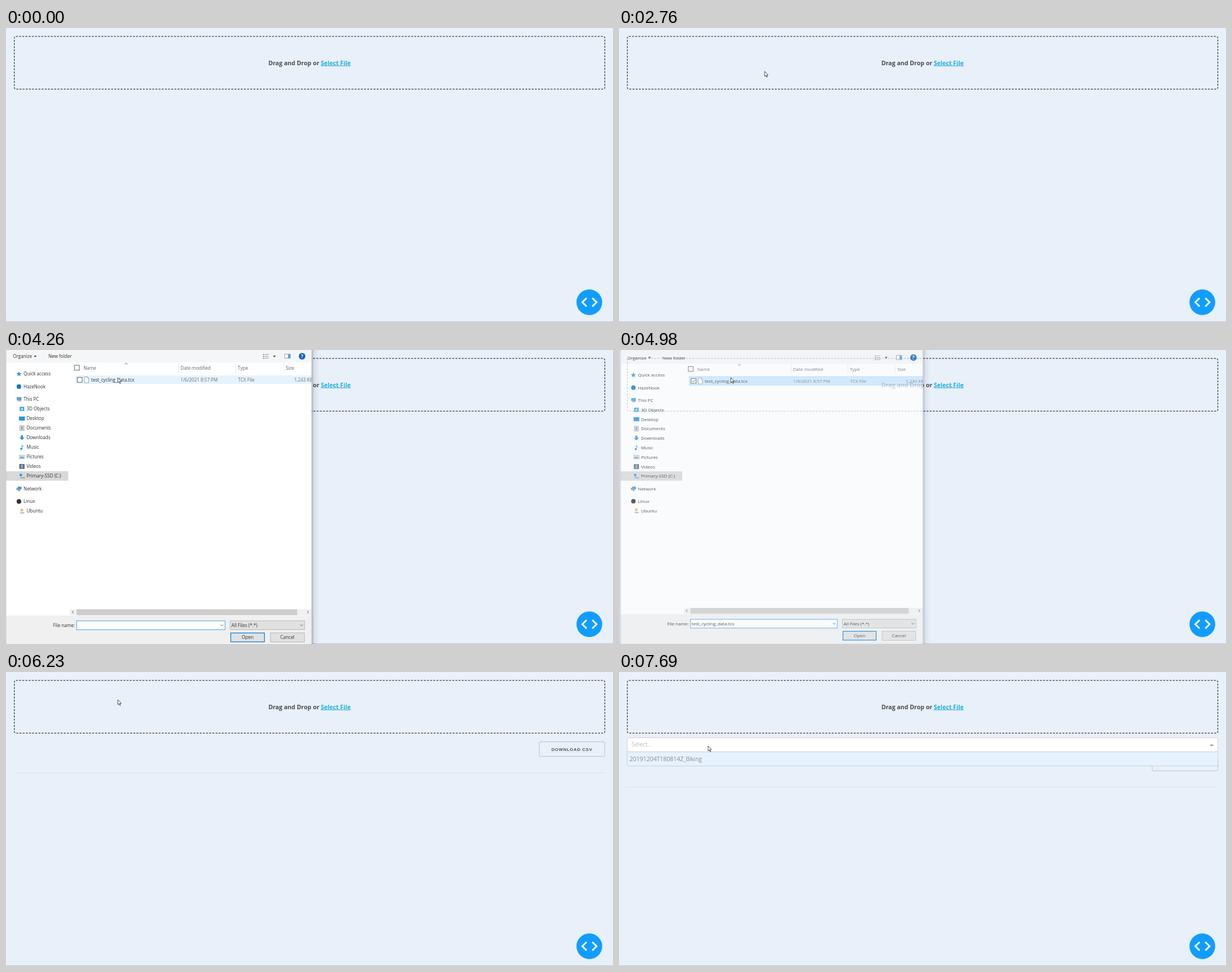
An HTML page for the animation above (8000 ms loop, 1075 by 521 pixels).

```html
<!DOCTYPE html>
<html lang="en">
<head>
<meta charset="utf-8">
<title>File upload</title>
<style>
  html, body { margin: 0; width: 100%; height: 100%; overflow: hidden; background: #e8f0fa; }
  svg { display: block; width: 100%; height: 100%; font-family: "Open Sans", sans-serif; }
  .upload { font-size: 10.59px; font-weight: 700; fill: #4c4c4c; }
  .light { font-size: 10.5px; font-weight: 300; }
  .button { font: 700 7.7px "Liberation Sans", Arial, sans-serif; letter-spacing: .7px; fill: #555; }
  #dialog { font-size: 8px; fill: #303030; }
  .head { fill: #5a6472; }
  .dim { fill: #6d6d6d; }
  .line { fill: none; stroke: #4a4a4a; stroke-width: .9; }
</style>
</head>
<body>
<svg viewBox="0 0 1075 521">
  <defs>
    <linearGradient id="shade">
      <stop stop-color="#000" stop-opacity=".28"/>
      <stop offset=".3" stop-color="#000" stop-opacity=".07"/>
      <stop offset="1" stop-color="#000" stop-opacity="0"/>
    </linearGradient>
    <clipPath id="window"><rect x="2.4" y="-40" width="536.1" height="570"/></clipPath>
  </defs>

  <rect width="1075" height="521" fill="#e8f0fa"/>
  <rect y="520" width="1075" height="1" fill="#bcc3cc"/>
  <rect x="14.7" y="14.8" width="1045.8" height="93.6" rx="3" fill="none" stroke="#363636" stroke-width="1.3" pathLength="4060" stroke-dasharray="6 4"/>
  <text class="upload" x="464.7" y="65.5">Drag and Drop or <tspan fill="#1eaedb" text-decoration="underline">Select File</tspan></text>

  <g id="results">
    <rect x="944.2" y="123.7" width="116.4" height="26" rx="2.8" fill="none" stroke="#bbb" stroke-width=".9"/>
    <text class="button" x="966" y="139.8">DOWNLOAD CSV</text>
    <path d="M14 178.5H1061" stroke="#dde2e9"/>
  </g>

  <g id="select">
    <rect x="14.5" y="116.4" width="1046.2" height="25" rx="2.8" fill="#fff" stroke="#ccc" stroke-width=".9"/>
    <text class="light" x="22.3" y="132.4" fill="#999">Select...</text>
    <path id="arrow" fill="#999"/>
  </g>
  <g id="menu">
    <path d="M14.5 141.5H1060.7V164Q1060.7 166.5 1058 166.5H17.3Q14.5 166.5 14.5 164Z" fill="#e6f2fe" stroke="#ccc" stroke-width=".9"/>
    <text class="light" x="18.8" y="157.7" fill="#555">20191204T180814Z_Biking</text>
  </g>

  <g id="dialog"></g>

  <circle cx="1033.1" cy="486" r="22.8" fill="#119dff"/>
  <path d="M1028.2 478.6L1020.6 486L1028.2 493.4M1038.4 478.6L1046 486L1038.4 493.4" fill="none" stroke="#fff" stroke-width="2.9"/>

  <circle id="press" r="8.6" fill="#ff0" fill-opacity=".5"/>
  <path id="cursor" d="M.4 .6V9.4L2.4 7.6L4 11L5.3 10.4L3.8 7.2H6.5Z" fill="#fff" stroke="#222" stroke-width=".8"/>
</svg>

<script>
const $ = id => document.getElementById(id);
const text = (x, y, label, cls = '', anchor = 'start') =>
  `<text x="${x}" y="${y}" class="${cls}" text-anchor="${anchor}">${label}</text>`;
const rect = (x, y, w, h, fill, stroke = 'none', width = 1) =>
  `<rect x="${x}" y="${y}" width="${w}" height="${h}" fill="${fill}" stroke="${stroke}" stroke-width="${width}"/>`;
const path = (d, fill = 'none', stroke = 'none') => `<path d="${d}" fill="${fill}" stroke="${stroke}" stroke-width=".9"/>`;
const dot = (x, y, r, fill) => `<circle cx="${x}" cy="${y}" r="${r}" fill="${fill}"/>`;
const line = d => `<path d="${d}" class="line"/>`;
const chevron = (x, y) => line(`M${x - 2.3} ${y - 1}l2.3 2.3l2.3 -2.3`);
const group = (id, content) => `<g id="${id}">${content}</g>`;

// Icons are centred on 0,0.
const icons = {
  star: path('M0 -4.8L1.3 -1.4L4.8 -1.4L2 .8L3 4.4L0 2.2L-3 4.4L-2 .8L-4.8 -1.4L-1.3 -1.4Z', '#2f9be0'),
  disc: dot(0, 0, 4, '#0f78d4'),
  computer: rect(-3.5, -3.5, 7.5, 5, '#4aa7e6', '#7b98ad', .8) + rect(-1.5, 2.3, 5, 1.3, '#8da1b0'),
  cube: rect(-4, -3.6, 8, 7.2, '#35a3dc') + rect(-2, -1.4, 4, 3.6, '#a9def5'),
  screen: rect(-4.6, -3, 9.2, 6.2, '#1d9be6', '#1579bd', .8),
  page: rect(-3.6, -4.3, 7.2, 8.6, '#eef3f7', '#8795a3', .8) + line('M-2 -2H2M-2 0H2M-2 2H2'),
  down: path('M-1.8 -4.4H1.8V-.4H4.4L0 4.4L-4.4 -.4H-1.8Z', '#3d8fd1'),
  note: dot(-1.3, 2.8, 1.8, '#1a8fe0') + path('M0 3V-4Q1 -2 3 -1', 'none', '#1a8fe0'),
  picture: rect(-4.6, -3, 9.2, 6.2, '#e6edf2', '#93a3b0', .8) + rect(-3.2, -.4, 6.4, 2.4, '#5b9cc8'),
  film: rect(-4.4, -4.2, 8.8, 8.4, '#4d5560') + rect(-2.3, -3.2, 4.6, 6.4, '#7ba6d0'),
  drive: rect(-4, -3.8, 4, 4, '#1d9be6') + rect(-3, 2, 8, 2, '#98a2aa'),
  network: rect(-2, -3.6, 6.4, 5, '#3a93d3') + rect(-4.4, -1.6, 5, 4, '#7c9db5') + rect(-1, 2.4, 3, 1.6, '#3a7fb5'),
  dark: dot(0, 0, 4, '#333'),
  tan: rect(-2.4, -4, 4.4, 4.8, '#e5ba78') + rect(-3, 2.2, 7, 2, '#b9b0a4')
};

const places = [['Quick access', 'star'], ['HazeNook', 'disc'], ['This PC', 'computer']];
const folders = [['3D Objects', 'cube', 1], ['Desktop', 'screen', 1], ['Documents', 'page', 1],
  ['Downloads', 'down', 1], ['Music', 'note', 1], ['Pictures', 'picture', 1], ['Videos', 'film', 1],
  ['Primary-SSD (C:)', 'drive', 1]];
const others = [['Network', 'network'], ['Linux', 'dark'], ['Ubuntu', 'tan', 1]];

function tree(items, selected) {
  let y = 22.1;
  return items.map(([label, icon, child], i) => {
    y += child ? 16.8 : 22.3;
    const indent = child ? 5.3 : 0;
    return (i === selected ? rect(2, y - 8.4, 110, 16.6, '#d9d9d9') : '') +
      `<g transform="translate(${25.5 + indent} ${y})">${icons[icon]}</g>` +
      text(33.6 + indent, y + 2.9, label);
  }).join('');
}

const toolbar = text(15, 16.7, 'Organize') + path('M51.6 12.3h5l-2.5 3Z', '#444') + text(77, 16.7, 'New folder') +
  [9.5, 12.8, 16.1].map(y => rect(453, y, 2.4, 1.8, '#8a9aa8') + rect(456.5, y + .3, 6.5, 1, '#999')).join('') +
  path('M470.5 12.3h5l-2.5 3Z', '#444');

const header = rect(122.7, 29.3, 8.6, 8.6, '#fff', '#555', .9) + line('M211 27.4l2.3 -2l2.3 2') +
  [304.5, 405, 488.5].map(x => rect(x, 25, .8, 17, '#e3e3e3')).join('') +
  [[138.5, 'Name'], [308.5, 'Date modified'], [409, 'Type'], [493, 'Size']].map(([x, s]) => text(x, 36.7, s, 'head')).join('');

const fileRow = group('hover', rect(124.8, 47.2, 420, 15, '#e5f3ff') + rect(127.7, 50.4, 8.6, 8.6, '#fff', '#555', .9)) +
  group('chosen', rect(124.8, 47.2, 420, 15, '#cce8ff', '#99d1ff', .8) +
    rect(127.7, 50.4, 8.6, 8.6, '#fff', '#555', .9) + line('M129.5 54.8l2 2.1l3.4 -4.2')) +
  path('M140.4 49.4H145.4L147.7 51.7V60H140.4ZM145.4 49.4V51.7H147.7', '#fff', '#999') +
  text(152, 57.9, 'test_cycling_data.tcx') + text(308.5, 57.9, '1/6/2021 8:57 PM', 'dim') +
  text(409.5, 57.9, 'TCX File', 'dim') + text(507.8, 57.9, '1,243 KB', 'dim');

const footer = rect(115, 457, 423, 10.5, '#f0f0f0') + rect(126.5, 457, 386.3, 10.5, '#cdcdcd') +
  line('M121.2 459.7l-2.3 2.3l2.3 2.3M530.6 459.7l2.3 2.3l-2.3 2.3') +
  rect(2, 468, 540, 70, '#f0f0f0') + text(123.5, 487.8, 'File name:', '', 'end') +
  rect(126.6, 477.2, 260, 15.6, '#fff', '#3f94db', .9) + chevron(381, 484.8) +
  group('caret', rect(128.6, 479.5, .9, 11, '#222')) + group('filename', text(128.6, 487.8, 'test_cycling_data.tcx')) +
  rect(395.5, 477.2, 130.5, 15.4, '#e1e1e1', '#adadad', .8) + text(397.8, 487.8, 'All Files (*.*)') + chevron(520.5, 484.8) +
  rect(396.6, 498.5, 58.9, 15.6, '#e1e1e1', '#0078d7', 1.2) + text(426, 509, 'Open', '', 'middle') +
  rect(466, 498.2, 59.6, 16.2, '#e1e1e1', '#adadad', .8) + text(495.7, 509, 'Cancel', '', 'middle');

$('dialog').innerHTML = rect(-12, -40, 14.5, 570, '#cbd2da') + rect(538.4, -40, 14, 570, 'url(#shade)') +
  '<g clip-path="url(#window)">' +
  rect(2, -40, 540, 570, '#fff') + rect(2, -40, 540, 64.3, '#f5f6f7') +
  group('toolbar', toolbar) +
  rect(491.3, 9.5, 9.5, 7.6, '#fff', '#7b8c99', .8) + rect(496.8, 10, 3.8, 6.7, '#4aa3e0') +
  dot(521.5, 13.4, 5.8, '#1a69c0') +
  '<text x="521.5" y="16.4" text-anchor="middle" font-weight="700" fill="#fff">?</text>' +
  header + fileRow +
  group('collapsed', tree([...places, ...others], 2)) +
  group('expanded', tree([...places, ...folders, ...others], 10)) +
  footer + rect(2.4, -40, .7, 570, '#999') + rect(537.8, -40, .7, 570, '#999') + '</g>';

// Pointer travel: start, end, steps, from, to, optional bend.
const moves = [
  [280, 510, 4, [1071, 537], [620, 382]],
  [1040, 1350, 5, [620, 382], [184.4, 146]],
  [1990, 2310, 5, [184.4, 146], [257.6, 76.2], [207, 73]],
  [3960, 4260, 5, [257.6, 76.2], [197.6, 48.4]],
  [6920, 7230, 5, [197.6, 48.4], [157.4, 130.4]]
];
const presses = [[1830, 2460], [2690, 2760], [4580, 4910], [7460, 7690]];

// Dialog window: time, opacity, scale.
const dialogSteps = [
  [0, 0, 1], [3470, .3, .975], [3550, .75, .995], [3640, .91, 1.0055], [3720, .98, 1.01], [3800, 1, 1.011],
  [4910, .95, 1.007], [4980, .77, 1], [5060, .35, .985], [5130, 0, 1]
];

function pointer(t) {
  const move = moves.findLast(m => t >= m[0]);
  if (!move) return [-50, -50];
  const [start, end, steps, from, to, bend] = move;
  const step = Math.min(steps, Math.floor((t - start + 1) / (end - start) * (steps - 1)) + 1);
  const p = step / steps, e = p * p * (3 - 2 * p);
  return from.map((a, i) => {
    const mid = bend ? bend[i] : (a + to[i]) / 2;
    return (1 - e) ** 2 * a + 2 * e * (1 - e) * mid + e * e * to[i];
  });
}

const show = (id, visible) => $(id).setAttribute('display', visible ? 'inline' : 'none');

function draw(t) {
  const [x, y] = pointer(t);
  for (const id of ['cursor', 'press']) $(id).setAttribute('transform', `translate(${x} ${y})`);
  show('press', presses.some(([from, to]) => t >= from && t < to));

  const [, opacity, scale] = dialogSteps.findLast(s => t >= s[0]);
  $('dialog').setAttribute('opacity', opacity);
  $('dialog').setAttribute('transform', `translate(262 230) scale(${scale}) translate(-262 -230)`);
  const loaded = t >= 3720, chosen = t >= 4580;
  show('dialog', opacity > 0);
  show('toolbar', loaded);
  show('expanded', loaded);
  show('collapsed', !loaded);
  show('hover', y < 60 && !chosen);
  show('chosen', chosen);
  show('filename', chosen);
  show('caret', t < 4110);

  const listed = t >= 6290, open = t >= 7610;
  show('results', t >= 6230);
  $('results').setAttribute('transform', `translate(0 ${listed ? 25.4 : 0})`);
  show('select', listed);
  show('menu', open);
  $('arrow').setAttribute('d', open ? 'M1046 131h7l-3.5 -3.5Z' : 'M1046 127.5h7l-3.5 3.5Z');
}

function tick() {
  draw(performance.now() % 8000);
  requestAnimationFrame(tick);
}
tick();
</script>
</body>
</html>
```
